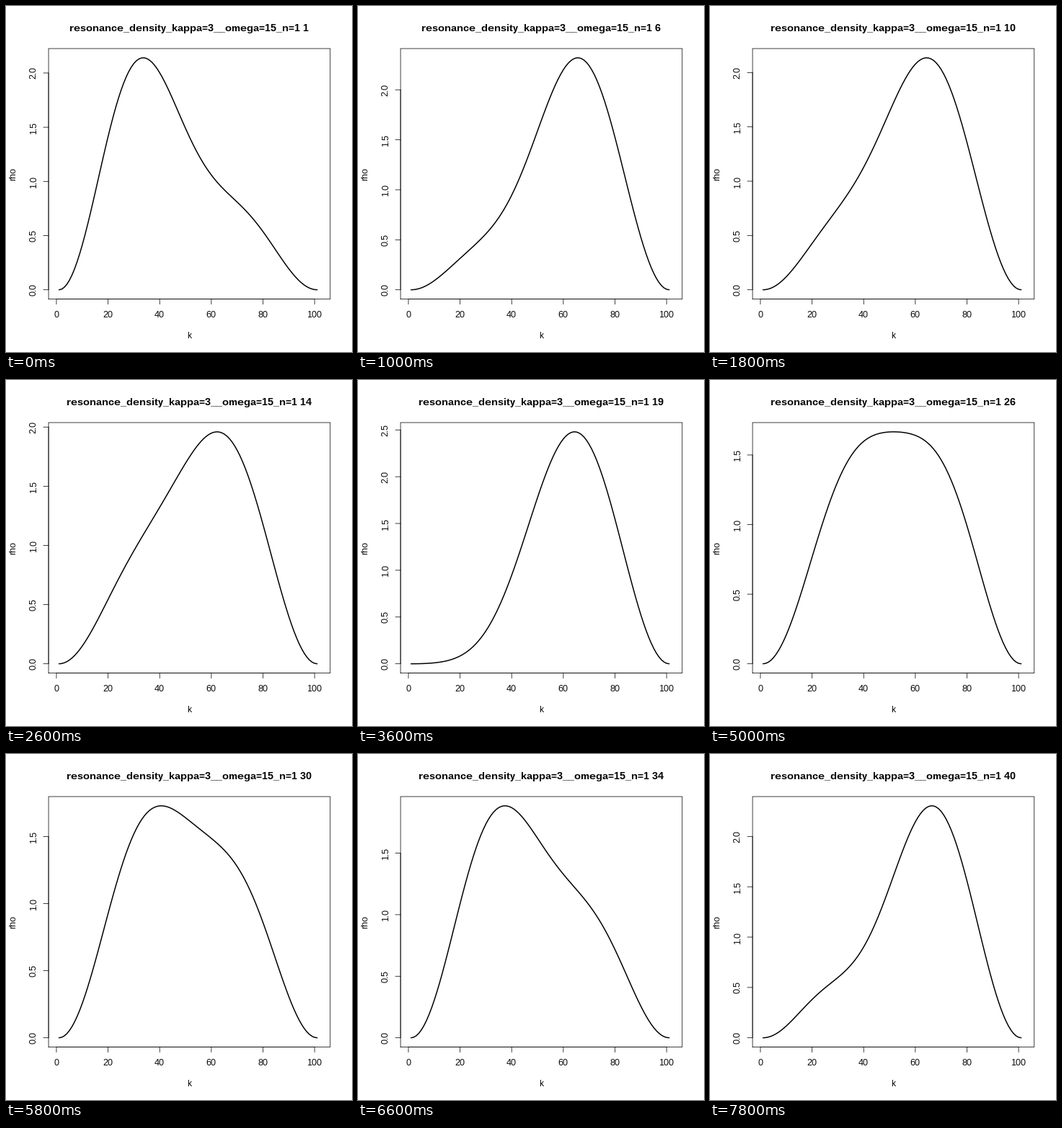
These frames come from a looping animation (480 px wide and 480 px high, 8 s). A matplotlib script:

```python
import numpy as np
import matplotlib.pyplot as plt
from matplotlib.animation import FuncAnimation

SIZE, DPI = 480, 72
FRAMES, INTERVAL = 40, 200
LEFT, RIGHT, TOP, BOTTOM = 59.04, 449.76, 59.04, 406.56
LINE = 14.4                      # height of one margin line
TICK = LINE / 2
K_MIN, K_MAX = -3.04, 106.04
TITLE = "resonance_density_kappa=3__omega=15_n=1 {}"
OMEGA, DT = 15, 0.1

# slowly varying parts of the driven state, given at a few steps
STEPS = [1, 6, 14, 19, 26, 34, 40]
GROUND = [0.736, 0.826, 0.885, 0.899, 0.863, 0.819, 0.786]
MIXING = [1.799, 1.503, 1.367, 1.275, 1.492, 1.615, 1.643]
LAG = [-0.404, -0.295, -0.168, -0.150, 0.274, 0.520, 0.496]
SKEW = [0.207, 0.089, 0.057, -0.094, -0.131, -0.026, 0.160]

k = np.arange(1, 102)
cos_x = np.cos(np.pi * (k - 1) / 100)


def density(step):
    """Probability density in the box for the lowest three levels."""
    ground, mixing, lag, skew = (
        np.interp(step, STEPS, v) for v in (GROUND, MIXING, LAG, SKEW))
    phase = OMEGA * DT * step + lag
    p0 = ground + 0.03 * np.cos(2 * phase)
    p1 = mixing * np.cos(phase)
    p2 = 4 * (1 - p0)
    p3 = skew - 0.2 * np.cos(phase)
    shape = p0 + cos_x * (p1 + cos_x * (p2 + cos_x * p3))
    return 2 * (1 - cos_x ** 2) * shape


def to_x(v):
    return LEFT + (v - K_MIN) / (K_MAX - K_MIN) * (RIGHT - LEFT)


def to_y(v, peak):
    return BOTTOM - (v / peak + 0.04) / 1.08 * (BOTTOM - TOP)


# whole-pixel letter spacing
plt.rcParams.update({"font.family": "Liberation Sans",
                     "text.hinting": "default", "text.hinting_factor": 1})
fig = plt.figure(figsize=(SIZE / DPI, SIZE / DPI), dpi=DPI, facecolor="white")
ax = fig.add_axes([0, 0, 1, 1])
ax.set_xlim(0, SIZE)
ax.set_ylim(SIZE, 0)
ax.axis("off")


def rule(xs, ys):
    return ax.plot(xs, ys, color="black", lw=0.75, snap=False,
                   solid_capstyle="round", solid_joinstyle="round")[0]


def label(x, y, text, size=12, **kw):
    return ax.text(x, y, text, fontsize=size, color="black", ha="center",
                   va="baseline", rotation_mode="anchor", **kw)


rule([LEFT, RIGHT, RIGHT, LEFT, LEFT], [BOTTOM, BOTTOM, TOP, TOP, BOTTOM])
rule([to_x(0), to_x(100)], [BOTTOM, BOTTOM])
for v in range(0, 101, 20):
    rule([to_x(v)] * 2, [BOTTOM, BOTTOM + TICK])
    label(to_x(v), BOTTOM + 1.8 * LINE, str(v))

mid_x, mid_y = (LEFT + RIGHT) / 2, (TOP + BOTTOM) / 2
label(mid_x, BOTTOM + 3.8 * LINE, "k")
label(LEFT - 3.2 * LINE, mid_y, "rho", rotation=90)
title = label(mid_x, 34.7, "", size=14.4, weight="bold")

y_axis = rule([LEFT, LEFT], [BOTTOM, TOP])
y_ticks = []
for v in np.arange(0, 3.1, 0.5):
    mark = rule([LEFT - TICK, LEFT], [0, 0])
    text = label(LEFT - 1.2 * LINE, 0, f"{v:.1f}", rotation=90)
    y_ticks.append((v, mark, text))

curve, = ax.plot([], [], color="black", lw=1.5,
                 solid_capstyle="round", solid_joinstyle="round")


def update(i):
    step = i + 1
    rho = density(step)
    peak = rho.max()
    curve.set_data(to_x(k), to_y(rho, peak))
    title.set_text(TITLE.format(step))
    last = 0
    for v, mark, text in y_ticks:
        shown = v <= 1.04 * peak
        mark.set_visible(shown)
        text.set_visible(shown)
        if shown:
            y = last = to_y(v, peak)
            mark.set_ydata([y, y])
            text.set_y(y)
    y_axis.set_ydata([to_y(0, peak), last])
    return []


anim = FuncAnimation(fig, update, frames=FRAMES, interval=INTERVAL,
                     init_func=lambda: update(0), repeat=True, blit=False)
plt.show()
```
